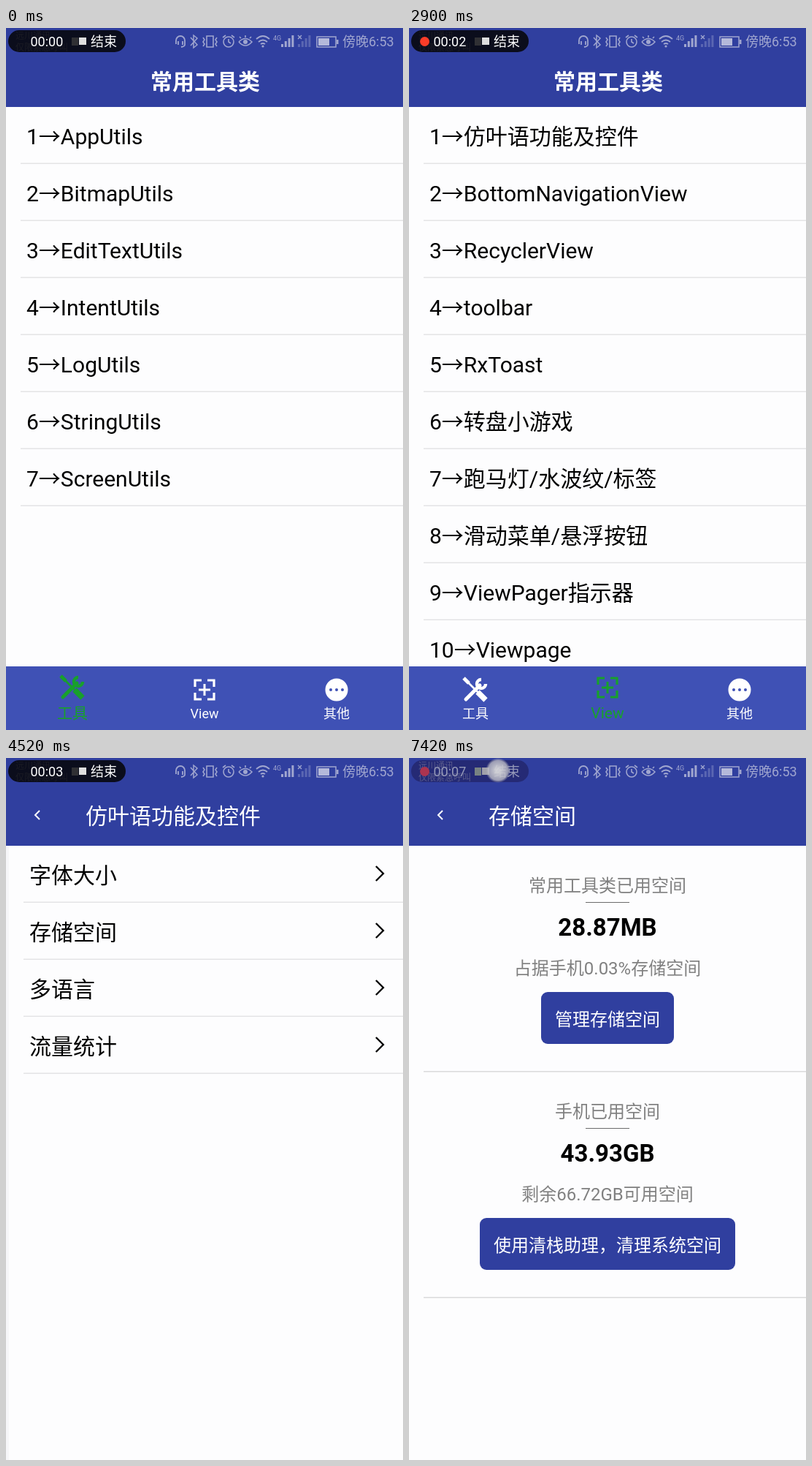
These frames come from a looping animation (544x960 px, 7.48 s). An HTML page with a canvas:

```html
<!DOCTYPE html>
<html lang="zh-CN">
<head>
<meta charset="utf-8">
<style>
html, body { margin: 0; width: 100%; height: 100%; overflow: hidden; background: #fdfdfe; }
canvas { display: block; }
</style>
</head>
<body>
<canvas width="544" height="960"></canvas>
<script>
const g = document.querySelector('canvas').getContext('2d');
const W = 544, H = 960, LOOP = 7480;
const CJK = '"Noto Sans CJK SC", "Noto Sans CJK", sans-serif';
const FONT = 'Roboto, ' + CJK;
const BLUE = '#303f9f', PAPER = '#fdfdfe', RULE = '#e4e4e6', MUTED = '#808080', ICON = '#a0a6cf';
const BAR = '#3f51b5', GREEN = [24, 160, 44], DARK_GREEN = [30, 134, 66];

const utils = ['App', 'Bitmap', 'EditText', 'Intent', 'Log', 'String', 'Screen'].map(s => s + 'Utils');
const views = ['仿叶语功能及控件', 'BottomNavigationView', 'RecyclerView', 'toolbar', 'RxToast', '转盘小游戏',
  '跑马灯/水波纹/标签', '滑动菜单/悬浮按钮', 'ViewPager指示器', 'Viewpage'];
const options = ['字体大小', '存储空间', '多语言', '流量统计'];
const seconds = [0, 900, 1850, 3800, 5400, 6400, 6800, 7150, LOOP];

const ramp = (t, a, b) => Math.min(1, Math.max(0, (t - a) / (b - a)));
const easeOut = (u, p) => 1 - (1 - u) ** p;
const mix = (a, b, u) => `rgb(${a.map((v, i) => v + (b[i] - v) * u)})`;

function rect(x, y, w, h, color) {
  g.fillStyle = color;
  g.fillRect(x, y, w, h);
}

function round(x, y, w, h, r, color) {
  g.fillStyle = color;
  g.beginPath();
  g.roundRect(x, y, w, h, r);
  g.fill();
}

function disc(x, y, r, color) {
  g.fillStyle = color;
  g.beginPath();
  g.arc(x, y, r, 0, 7);
  g.fill();
}

function stroke(d, width, color) {
  g.lineWidth = width;
  g.strokeStyle = color;
  g.stroke(new Path2D(d));
}

// y is the middle of the capitals
function text(s, x, y, size, color, { weight = 400, align = 'left', font = FONT } = {}) {
  g.font = `${weight} ${size}px ${font}`;
  g.textAlign = align;
  g.fillStyle = color;
  g.fillText(s, x, y + size * 0.355);
  return g.measureText(s).width;
}

function at(x, y, draw) {
  g.save();
  g.translate(x, y);
  draw();
  g.restore();
}

function numberedList(items) {
  items.forEach((s, i) => {
    const y = 148 + 78 * i;
    let x = 28 + text(i + 1, 28, y, 30, '#000');
    x += text('→', x, y, 30, '#000', { font: CJK });
    text(s, x, y, 30, '#000');
    rect(20, y + 36.5, W - 20, 1.5, RULE);
  });
}

function toolsIcon(c) {
  g.lineCap = 'round';
  stroke('M-13 13L6 -6', 5, c);
  g.lineCap = 'butt';
  stroke('M8 -14A6 6 0 1 0 14 -8', 4.5, c);
  stroke('M-16 -16L-9 -9', 5, c);
  stroke('M-10 -10L4 4', 2.6, c);
  stroke('M3 3L14 14', 7.5, c);
}

function frameIcon(c) {
  stroke('M-13 -4V-13H-4M4 -13H13V-4M13 4V13H4M-4 13H-13V4', 3.2, c);
  stroke('M-8 0H8M0 -8V8', 3, c);
}

function moreIcon(c) {
  disc(0, 0, 15.5, c);
  for (const x of [-8, 0, 8]) disc(x, 0, 2, BAR);
}

function tab(x, label, icon, grow, color) {
  at(x, 905 - 3 * grow, () => icon(color));
  text(label, x, 938 - grow, 18 + 3 * grow, color, { align: 'center' });
}

function homePage(t) {
  rect(0, 0, W, H, PAPER);
  const x = -W * easeOut(ramp(t, 650, 1154), 5);
  at(x, 0, () => numberedList(utils));
  at(x + W, 0, () => numberedList(views));
  rect(0, 0, W, 108, BLUE);
  text('常用工具类', 273, 73, 30, '#fff', { weight: 700, align: 'center' });

  rect(0, 873, W, 87, BAR);
  const swapped = t >= 970, grow = ramp(t, 1000, 1130);
  tab(91, '工具', toolsIcon, 1 - grow, swapped ? '#fff' : `rgb(${GREEN})`);
  tab(272, 'View', frameIcon, grow, swapped ? mix(DARK_GREEN, GREEN, grow) : '#fff');
  tab(453, '其他', moreIcon, 0, '#fff');
}

function header(title) {
  rect(0, 0, W, 120, BLUE);
  stroke('M46 72L40 78L46 84', 2, '#fff');
  text(title, 109, 79.5, 30, '#fff', { weight: 500 });
}

function optionsPage(t) {
  rect(0, 0, W, H, '#f6f6f9');
  at(W * (1 - easeOut(ramp(t, 3298, 4635), 2)), 0, () => {
    rect(0, 120, W, H, PAPER);
    options.forEach((s, i) => {
      const y = 160 + 78 * i;
      text(s, 28, y, 30, '#000');
      stroke(`M503 ${y - 12}l10 10l-10 10`, 2.4, '#000');
      rect(20, y + 36.5, W - 20, 1.5, RULE);
    });
  });
  header(views[0]);
}

function usage(y, caption, amount, note, action, width) {
  const mid = { align: 'center' };
  text(caption, 272, y, 24, MUTED, mid);
  rect(242, y + 23, 60, 1, '#6c6c6c');
  text(amount, 272, y + 57, 33, '#000', { ...mid, weight: 700 });
  text(note, 272, y + 113, 24, MUTED, mid);
  round(272 - width / 2, y + 146, width, 71, 9, BLUE);
  text(action, 272, y + 183, 24, '#fff', { ...mid, weight: 500 });
  rect(20, y + 254, W - 20, 1.5, '#dadadc');
}

function storagePage() {
  rect(0, 0, W, H, PAPER);
  header('存储空间');
  usage(174, '常用工具类已用空间', '28.87MB', '占据手机0.03%存储空间', '管理存储空间', 182);
  usage(483, '手机已用空间', '43.93GB', '剩余66.72GB可用空间', '使用清栈助理，清理系统空间', 350);
}

// A new page slides in while the one behind it darkens
function slideOver(p, behind, page) {
  behind();
  if (p <= 0) return;
  rect(0, 0, W, H, `rgba(0,0,0,${0.5 * p})`);
  at(W * (1 - p), 0, page);
}

function statusBar() {
  stroke('M233 22v-5a6 6 0 0 1 12 0v6q0 2-5 3M236 18v5M242 18v5', 1.8, ICON);
  stroke('M253 13l9 10l-5 4V10l5 4l-9 10', 1.5, ICON);
  stroke('M275 11h9v15h-9zM270 13l2 3l-2 3l2 3l-2 3M289 13l-2 3l2 3l-2 3l2 3', 1.6, ICON);
  stroke('M312 19a7 7 0 1 1-14 0a7 7 0 1 1 14 0M305 15v4l3 2M297 13l4-3M313 13l-4-3', 1.6, ICON);
  stroke('M319 19q9-9 18 0q-9 10-18 0M322 14l-2-2M328 13v-3M334 14l2-2', 1.6, ICON);
  disc(328, 19, 3, ICON);
  stroke('M343 15q9-8 18 0M346 19q6-5 12 0M349 22q3-2 6 0', 1.8, ICON);
  disc(352, 25, 1.6, ICON);
  text('4G', 366, 14, 9, ICON);
  for (let i = 0; i < 4; i++) {
    const h = 4 + 4 * i;
    rect(377 + 4.8 * i, 26 - h, 3, h, ICON);
    rect(400 + 4.8 * i, 26 - h, 3, h, '#5a66b2');
  }
  stroke('M400 10l5 5M405 10l-5 5', 1.4, ICON);
  stroke('M426 12h26v14h-26z', 1.5, ICON);
  rect(428, 14, 15, 10, '#b4b9da');
  rect(453, 16, 2.5, 6, ICON);
  text('傍晚6:53', 461, 19, 18, ICON);
  text('远川通讯', 13, 11, 12, ICON);
  text('仅限紧急呼叫', 13, 27, 12, ICON);
}

function recorder(t) {
  const n = seconds.findLastIndex(s => t >= s);
  const press = ramp(t, 7240, 7400);
  const white = mix([255, 255, 255], [150, 154, 185], press);
  g.globalAlpha = 0.87 - 0.32 * press;
  round(3, 3, 161, 30, 15, mix([6, 6, 10], [28, 26, 84], press));
  g.globalAlpha = 1;
  if (t > (seconds[n] + seconds[n + 1]) / 2) disc(21.5, 18.5, 6.5, mix([250, 60, 40], [172, 52, 80], press));
  text('00:0' + n, 33.5, 19, 18, white);
  rect(90, 13, 9, 11, mix([48, 48, 52], [120, 130, 130], press));
  rect(100, 13, 10, 10, mix([222, 222, 222], [160, 160, 170], press));
  text('结束', 116, 19, 18, white);
  if (press > 0) {
    const glow = g.createRadialGradient(122, 17, 3, 122, 17, 17);
    glow.addColorStop(0, 'rgba(212,212,216,.95)');
    glow.addColorStop(.75, 'rgba(186,186,196,.8)');
    glow.addColorStop(1, 'rgba(170,170,180,0)');
    g.globalAlpha = press;
    disc(122, 17, 17, glow);
    g.globalAlpha = 1;
  }
}

function draw(now) {
  const t = now % LOOP;
  const toOptions = easeOut(ramp(t, 2930, 3300), 2);
  const toStorage = easeOut(ramp(t, 5600, 6060), 2);
  if (toStorage > 0) slideOver(toStorage, () => optionsPage(t), storagePage);
  else slideOver(toOptions, () => homePage(t), () => optionsPage(t));
  statusBar();
  recorder(t);
}

const start = performance.now();
function tick() {
  draw(performance.now() - start);
  requestAnimationFrame(tick);
}
tick();
</script>
</body>
</html>
```
